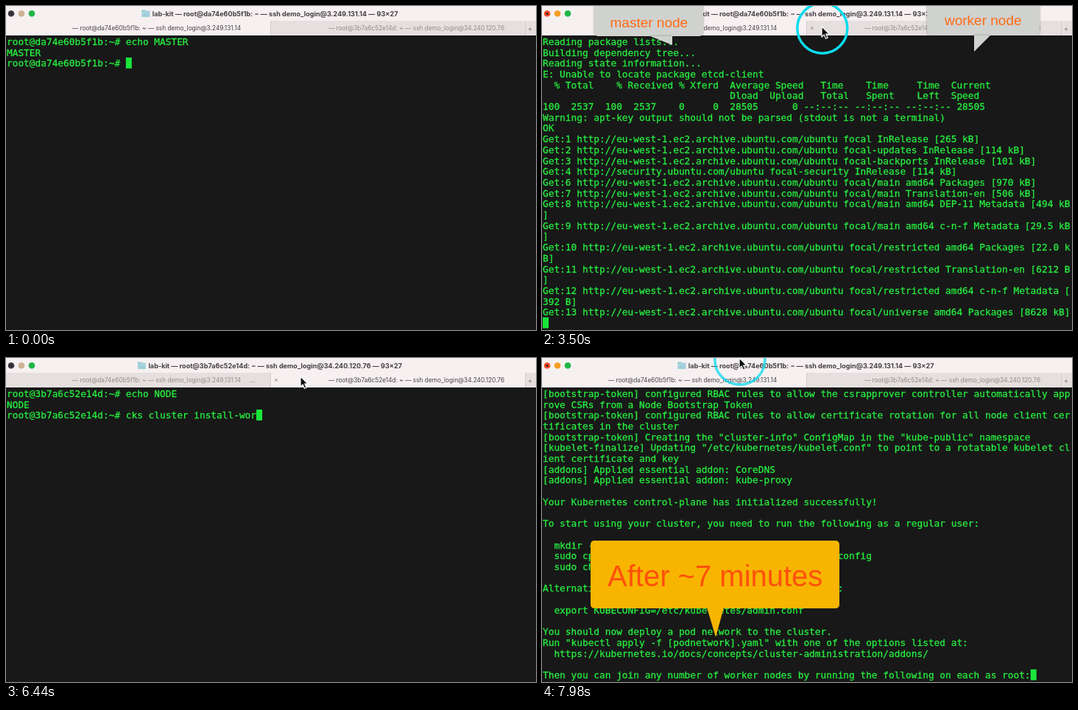
An HTML page with a canvas for the animation above (8 s loop, 720 by 440 pixels).

```html
<!DOCTYPE html>
<html lang="en">
<head>
<meta charset="utf-8">
<title>Cluster install</title>
<style>
html, body { margin: 0; width: 100%; height: 100%; overflow: hidden; background: #181818; }
canvas { display: block; width: 720px; height: 440px; }
</style>
</head>
<body>
<canvas id="stage" width="720" height="440"></canvas>
<script>
const ctx = document.getElementById('stage').getContext('2d');
const LOOP = 8000, STEP = 140;
const COLS = 93, ROWS = 27, TOP = 40.6, ROW_H = 14.7, CHAR_W = 7.706;
const MONO = '12.8px "DejaVu Sans Mono", monospace';
const UI = 'Inter, sans-serif';
const SANS = '"Liberation Sans", Arial, sans-serif';
const GREEN = '#27ee40';
const TO_WORKER = 3780, TO_MASTER = 7560;

// Timing and blending
const ramp = (t, from, to) => Math.min(1, Math.max(0, (t - from) / (to - from)));
const pulse = (t, rise, risen, fall, fallen) => ramp(t, rise, risen) * (1 - ramp(t, fall, fallen));
const lerp = (a, b, p) => a + (b - a) * p;
const mix = (a, b, p) => `rgb(${a.map((v, i) => Math.round(lerp(v, b[i], p)))})`;

// Terminal contents
const wrap = text => text.split('\n').flatMap(line => line.match(new RegExp(`.{1,${COLS}}`, 'g')) || ['']);

const READING = `Reading package lists...
Building dependency tree...
Reading state information...`;

const CHECKS = `${READING}
bash-completion is already the newest version (1:2.10-1ubuntu1).
binutils is already the newest version (2.34-6ubuntu1.1).
0 upgraded, 0 newly installed, 0 to remove and 23 not upgraded.
${READING}`;

const REPO = 'http://eu-west-1.ec2.archive.ubuntu.com/ubuntu focal';
const DOWNLOADS = `${CHECKS}
E: Unable to locate package etcd-client
  % Total    % Received % Xferd  Average Speed   Time    Time     Time  Current
                                 Dload  Upload   Total   Spent    Left  Speed
100  2537  100  2537    0     0  28505      0 --:--:-- --:--:-- --:--:-- 28505
Warning: apt-key output should not be parsed (stdout is not a terminal)
OK
Get:1 ${REPO} InRelease [265 kB]
Get:2 ${REPO}-updates InRelease [114 kB]
Get:3 ${REPO}-backports InRelease [101 kB]
Get:4 http://security.ubuntu.com/ubuntu focal-security InRelease [114 kB]
Get:6 ${REPO}/main amd64 Packages [970 kB]
Get:7 ${REPO}/main Translation-en [506 kB]
Get:8 ${REPO}/main amd64 DEP-11 Metadata [494 kB]
Get:9 ${REPO}/main amd64 c-n-f Metadata [29.5 kB]
Get:10 ${REPO}/restricted amd64 Packages [22.0 kB]
Get:11 ${REPO}/restricted Translation-en [6212 B]
Get:12 ${REPO}/restricted amd64 c-n-f Metadata [392 B]
Get:13 ${REPO}/universe amd64 Packages [8628 kB]`;

const finished = wrap(`[bootstrap-token] configured RBAC rules to allow the csrapprover controller automatically approve CSRs from a Node Bootstrap Token
[bootstrap-token] configured RBAC rules to allow certificate rotation for all node client certificates in the cluster
[bootstrap-token] Creating the "cluster-info" ConfigMap in the "kube-public" namespace
[kubelet-finalize] Updating "/etc/kubernetes/kubelet.conf" to point to a rotatable kubelet client certificate and key
[addons] Applied essential addon: CoreDNS
[addons] Applied essential addon: kube-proxy

Your Kubernetes control-plane has initialized successfully!

To start using your cluster, you need to run the following as a regular user:

  mkdir -p $HOME/.kube
  sudo cp -i /etc/kubernetes/admin.conf $HOME/.kube/config
  sudo chown $(id -u):$(id -g) $HOME/.kube/config

Alternatively, if you are the root user, you can run:

  export KUBECONFIG=/etc/kubernetes/admin.conf

You should now deploy a pod network to the cluster.
Run "kubectl apply -f [podnetwork].yaml" with one of the options listed at:
  https://kubernetes.io/docs/concepts/cluster-administration/addons/

Then you can join any number of worker nodes by running the following on each as root:`);

const master = {
  host: 'root@da74e60b5f1b', ip: '3.249.131.14', tabX: 204.5,
  word: 'MASTER', command: 'cks cluster install', log: wrap(DOWNLOADS),
  typed: t => ramp(t, 280, 1680),
  printed: t => ramp(t, 1680, 3500) ** 1.6
};
const worker = {
  host: 'root@3b7a6c52e14d', ip: '34.240.120.76', tabX: 557.5,
  word: 'NODE', command: 'cks cluster install-worker', log: wrap(CHECKS),
  typed: t => ramp(t, 4400, 6700),
  printed: t => ramp(t, 6720, 7140)
};
const session = shell => `${shell.host}: ~ — ssh demo_login@${shell.ip}`;
const part = (list, p) => list.slice(0, Math.floor(list.length * p));

// Drawing helpers
function rect(x, y, w, h, color) {
  ctx.fillStyle = color;
  ctx.fillRect(x, y, w, h);
}
function text(str, x, y, font, color, align = 'left') {
  ctx.font = font;
  ctx.fillStyle = color;
  ctx.textAlign = align;
  ctx.fillText(str, x, y);
}
function dot(x, y, r, color) {
  ctx.fillStyle = color;
  ctx.beginPath();
  ctx.arc(x, y, r, 0, Math.PI * 2);
  ctx.fill();
}
function bubble(x, y, w, h, tail, color) {
  ctx.fillStyle = color;
  ctx.beginPath();
  ctx.roundRect(x, y, w, h, 5);
  ctx.fill();
  ctx.beginPath();
  for (const [px, py] of tail) ctx.lineTo(px, py);
  ctx.fill();
}

function drawTerminal(lines) {
  const view = lines.slice(-ROWS);
  ctx.strokeStyle = GREEN;
  ctx.lineWidth = 0.3;
  view.forEach((line, i) => {
    const y = TOP + i * ROW_H + 12.2;
    text(line, 1, y, MONO, GREEN);
    ctx.strokeText(line, 1, y);
  });
  const last = view.length - 1;
  rect(1 + view[last].length * CHAR_W, TOP + last * ROW_H, 8, 14.8, '#19e63a');
}

function screenLines(t, shell) {
  if (t >= TO_MASTER) return finished;
  const prompt = shell.host + ':~# ';
  const output = part(shell.log, shell.printed(t));
  const lines = [prompt + 'echo ' + shell.word, shell.word, prompt + part(shell.command, shell.typed(t)), ...output];
  return output.length ? [...lines, ''] : lines;
}

function drawFolder(x) {
  rect(x, 5.5, 5, 3, '#86c3d4');
  rect(x, 6.5, 11, 8.5, '#9dcfdb');
  rect(x, 8.5, 11, 0.7, '#c0e3ea');
}

function drawLights(warmth) {
  dot(7, 10.3, 4.3, mix([60, 58, 68], [246, 74, 42], warmth));
  dot(21, 10.3, 4.3, mix([205, 177, 147], [245, 158, 34], warmth));
  dot(35, 10.3, 4.3, '#20b545');
  dot(7, 10.3, 1.5, '#2a2024');
}

function drawHeader(shell, warmth, hover) {
  const onWorker = shell === worker;
  rect(0, 0, 720, 40, '#f6f0f1');
  rect(0, 20, 720, 20, '#e5e0df');
  rect(onWorker ? 360 : 0, 20, onWorker ? 345 : 359, 20, '#f6f0f1');
  rect(359, 20, 1, 20, '#d3cecd');
  rect(705, 20, 1, 20, '#d3cecd');
  drawLights(warmth);

  const title = `lab-kit — ${session(shell)} — 93×27`;
  text(title, 365.7, 13.5, '700 9.1px ' + UI, '#454046', 'center');
  drawFolder(365.7 - ctx.measureText(title).width / 2 - 14.5);

  for (const tab of [master, worker]) {
    text('— ' + session(tab), tab.tabX, 33, '8.3px ' + UI, tab === shell ? '#474246' : '#918b8c', 'center');
  }
  if (onWorker) text('…', 335, 33, '8.3px ' + UI, '#7d7878', 'center');
  if (hover) text('×', 367, 33, '9px ' + UI, '#8b8687', 'center');
  text('+', 712, 33.5, '10px ' + UI, '#837e7f', 'center');
}

function drawLabels(alpha) {
  if (!alpha) return;
  const ink = '#ff6a14', font = '19px ' + SANS;
  ctx.save();
  ctx.globalAlpha = alpha;
  ctx.shadowColor = 'rgba(0,0,0,.35)';
  ctx.shadowBlur = 3;
  bubble(71, -6, 148, 47, [[147, 41], [177, 53], [177, 41]], '#d0d2cf');
  bubble(523, -6, 153, 46, [[587, 40], [587, 62], [609, 40]], '#d0d2cf');
  ctx.shadowColor = 'transparent';
  ctx.globalAlpha = Math.sqrt(alpha);
  text('master node', 92.5, 29, font, ink);
  text('worker node', 547, 26, font, ink);
  ctx.restore();
}

function drawNote(t) {
  const glow = ramp(t, 7280, 7560);
  ctx.save();
  ctx.globalAlpha = ramp(t, 7000, 7280);
  bubble(66, 248, 338, 92, [[224, 339], [236, 379], [247, 339]], mix([85, 97, 12], [247, 181, 0], glow));
  text('After ~7 minutes', 89, 309.6, '40px ' + SANS, mix([145, 59, 24], [255, 80, 12], glow));
  ctx.restore();
}

function mouseAt(t) {
  const enter = ramp(t, 3220, 3900), leave = ramp(t, 6860, 7980);
  if (!leave) return [lerp(366, 400, enter), lerp(30, 25, enter)];
  return [lerp(400, 268, leave ** 1.27), lerp(25, 0, leave) + 14.5 * Math.sin(Math.PI * leave)];
}

function drawMouse(t) {
  if (t < 3220) return;
  ctx.save();
  ctx.translate(...mouseAt(t));
  ctx.globalAlpha = pulse(t, 3220, 3360, 3780, 4060) + pulse(t, 6860, 7140, 7840, 8400);
  ctx.strokeStyle = '#0adcee';
  ctx.lineWidth = 3.5;
  ctx.beginPath();
  ctx.arc(0.8, 2.3, 34, 0, Math.PI * 2);
  ctx.stroke();

  ctx.globalAlpha = 1;
  ctx.beginPath();
  for (const [x, y] of [[0, 0], [0, 14], [3.2, 11], [5.5, 16.3], [8, 15.2], [5.8, 10.1], [10, 10]]) ctx.lineTo(x, y);
  ctx.closePath();
  ctx.fillStyle = '#0c0c0c';
  ctx.strokeStyle = '#fff';
  ctx.lineWidth = 1.2;
  ctx.fill();
  ctx.stroke();
  ctx.restore();
}

function draw(now) {
  const t = Math.floor((now % LOOP) / STEP) * STEP;
  const shell = t >= TO_WORKER && t < TO_MASTER ? worker : master;
  const labels = pulse(t, 1400, 1810, 3780, 4200);
  const warmth = Math.max(labels, ramp(t, 7000, 7560));
  rect(0, 0, 720, 440, '#181818');
  drawTerminal(screenLines(t, shell));
  drawHeader(shell, warmth, t >= 3360 && t < 7420);
  drawLabels(labels);
  drawNote(t);
  drawMouse(t);
}

const start = performance.now();
function tick() {
  draw(performance.now() - start);
  requestAnimationFrame(tick);
}
tick();
</script>
</body>
</html>
```
